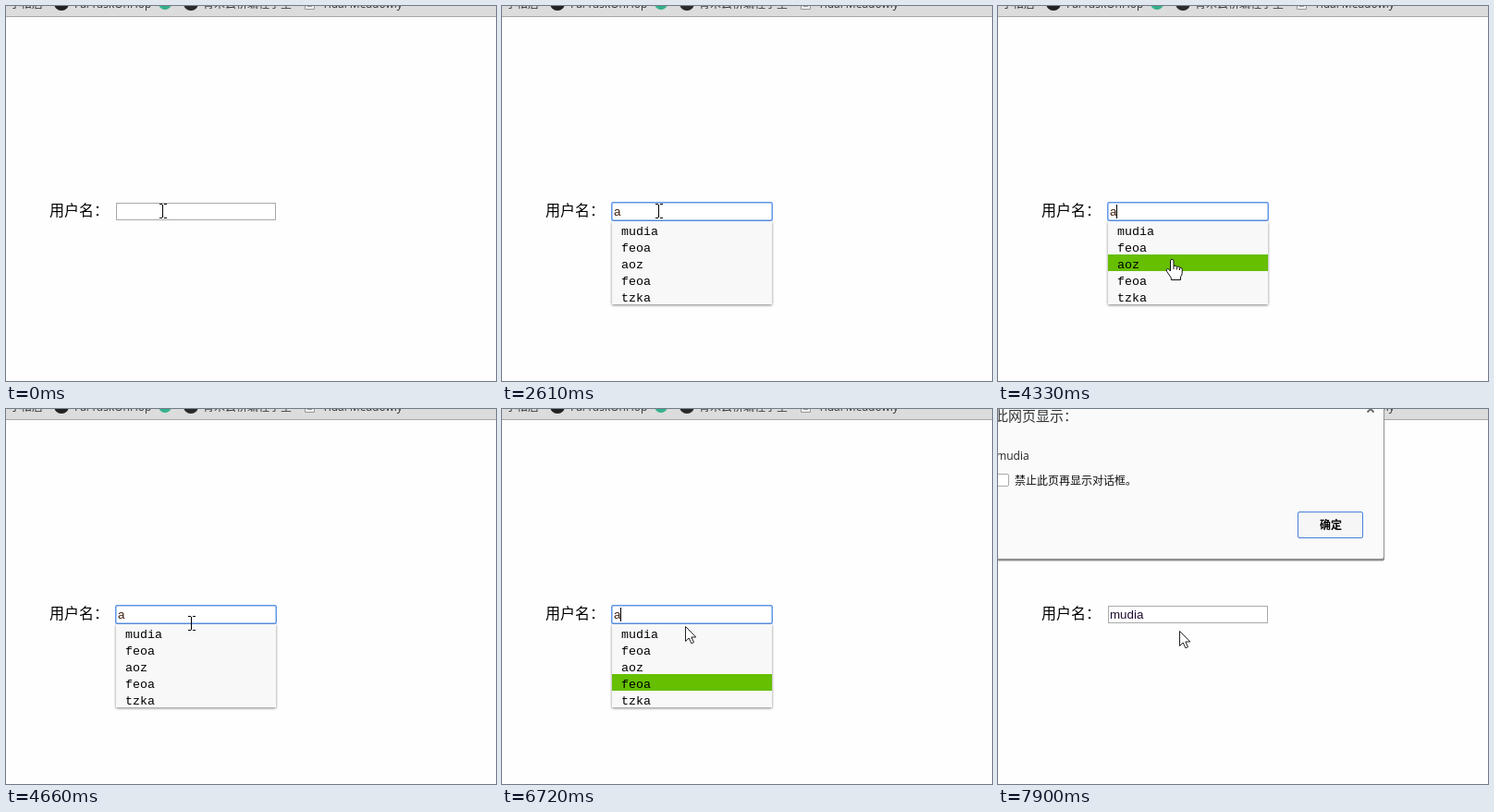
Recreate the animation shown at these times as an HTML page. Size 530x406 px, loop 8000 ms.

```html
<!DOCTYPE html>
<html lang="zh-CN">
<head>
<meta charset="utf-8">
<title>用户名</title>
<style>
html, body { margin: 0; width: 100%; height: 100%; overflow: hidden; background: #fefefe; }
svg { position: absolute; left: 0; top: 0; }
text { font-family: "Open Sans", "Noto Sans CJK SC", sans-serif; font-size: 12px; white-space: pre; }
#label { font: 300 16px "Noto Sans CJK SC", sans-serif; }
#value { font: 13.333px "Liberation Sans", Arial, sans-serif; }
#rows text { font: 13.333px "Liberation Mono", monospace; }
#menu { filter: drop-shadow(0 1px 1.5px rgba(0, 0, 0, .5)); }
.crisp { shape-rendering: crispEdges; }
</style>
</head>
<body>
<svg width="530" height="406" viewBox="0 0 530 406">
  <rect width="530" height="406" fill="#fefefe"/>

  <g id="bookmarks">
    <rect width="530" height="11" fill="#dcdcdc"/>
    <rect y="11" width="530" height="1" fill="#a6a6a6"/>
    <g fill="#333">
      <text x="4" y="2">小松居</text>
      <text x="74" y="2">FarTuskOnHop</text>
      <text x="213" y="2">青禾云桥编程学堂</text>
      <text x="342" y="2">Tidal Meadowly</text>
    </g>
    <circle cx="60" cy="-3" r="8" fill="#222"/>
    <circle cx="172" cy="-3" r="7" fill="#35b08c"/>
    <circle cx="200" cy="-3" r="8" fill="#2a2a2a"/>
    <path d="M323.500-8v11.500h10v-11.500M326 .5h5" fill="#eee" stroke="#999"/>
  </g>

  <text id="label" x="47" y="227">用户名：</text>
  <rect x="119.500" y="213.500" width="172" height="18" fill="#fff" stroke="#a9a9a9"/>
  <rect id="ring" x="118.750" y="212.750" width="173.500" height="19.500" rx="1.500" fill="#fff" stroke="#5e96ea" stroke-width="1.500"/>
  <text id="value" x="121" y="227"></text>
  <rect id="caret" class="crisp" y="215" width="1" height="15"/>

  <g id="list">
    <rect id="menu" x="119" y="233" width="173" height="90" fill="#f8f8f8"/>
    <g id="rows"></g>
  </g>

  <g id="dialog">
    <rect x="-10" y="-10" width="428" height="174.500" rx="2" fill="#8f8f8f"/>
    <rect x="-10" y="-10" width="427" height="172" rx="2" fill="#fafafa"/>
    <text x="-4" y="13" fill="#333" style="font-size:15px">此网页显示：</text>
    <path d="M399.500-3.500l7 7m0-7l-7 7" stroke="#666" stroke-width="1.800"/>
    <text x="-2" y="55" fill="#222">mudia</text>
    <rect x="-1.500" y="70.500" width="13" height="13" rx="1.500" fill="#fff" stroke="#aaa"/>
    <text x="18" y="82" fill="#111">禁止此页再显示对话框。</text>
    <rect x="324.500" y="111.500" width="70" height="28" rx="1.500" fill="#f6f6f6" stroke="#4a80dc"/>
    <text x="348" y="130" font-weight="700">确定</text>
  </g>

  <g id="mouse">
    <path id="beam" class="crisp" d="M-3.500-7.500h3m2 0h3M.5-7v14M-3.500 7.500h3m2 0h3" fill="none" stroke="#000"/>
    <path id="arrow" d="M.5 .5v16l3.700-3.500 2.700 5.800 2.600-1.200-2.700-5.600h5z" fill="#fff" stroke="#222"/>
    <g id="hand" stroke="#111" stroke-linejoin="round">
      <path d="M-1.500 13V2q0-1.700 1.700-1.700T2 2v5.500q3-1.200 3.300 .8 2.800-1 3.200 .9 2.700-.5 2.700 2v4q0 2-1.700 4v3.300H-.7v-2.200L-5.300 13.500q-1.200-2.200 .4-3 1.500-.5 3.400 2.500z" fill="#fff"/>
      <path d="M2 7.500v3.500M5.300 8.500v3M8.500 9.500v2.500" fill="none"/>
    </g>
  </g>
</svg>

<script>
const LOOP = 8000, ROW = 18, TOP = 233;
const FOCUS = 1250, OPEN = 1380, TYPED = 1990, FILTERED = 2080, PICKED = 7580;
const ALL = ['mudia', 'feoa', 'monlikurbet', 'aoz', 'feoa'];
const MATCHES = ['mudia', 'feoa', 'aoz', 'feoa', 'tzka'];
const BLINKS = [FOCUS, 1750, TYPED, 2610, 3140, 3640, 4150, 4660, 5180, 5680, 6230, 6780, 7240, PICKED];
const KEYS = [5230, 5420, 5620, 5830];
// time, x, y of the pointer's hot spot
const PATH = [
  [3410, 169, 222], [3750, 176, 273], [3900, 184, 288],
  [4280, 184, 288], [4440, 200, 232],
  [6719, 200, 232], [6720, 198, 235], [6750, 197, 238], [6780, 196, 240]
];

const $ = id => document.getElementById(id);
const show = (id, on) => $(id).style.display = on ? '' : 'none';
const passed = (times, t) => times.filter(k => k <= t).length;

function add(tag, attrs) {
  const el = document.createElementNS('http://www.w3.org/2000/svg', tag);
  for (const k in attrs) el.setAttribute(k, attrs[k]);
  return $('rows').appendChild(el);
}

const rows = MATCHES.map((_, i) => ({
  bar: add('rect', { x: 119, y: TOP + i * ROW, width: 173, height: ROW, fill: '#66bf00' }),
  text: add('text', { x: 129, y: TOP + 15 + i * ROW })
}));

function pointer(t) {
  t = Math.floor(t / 30) * 30;
  const i = PATH.findIndex(p => p[0] > t);
  if (i === 0) return PATH[0].slice(1);
  if (i < 0) return PATH[PATH.length - 1].slice(1);
  const [a, b] = [PATH[i - 1], PATH[i]];
  const k = (t - a[0]) / (b[0] - a[0]);
  return [1, 2].map(n => Math.round(a[n] + (b[n] - a[n]) * k));
}

function draw(t) {
  const [x, y] = pointer(t);
  const arrow = t >= PICKED || (t >= 6720 && t < 6750);
  const kind = arrow ? 'arrow' : y < TOP ? 'beam' : 'hand';
  for (const id of ['beam', 'arrow', 'hand']) show(id, id === kind);
  $('mouse').setAttribute('transform', `translate(${x} ${y})`);

  const picked = t >= PICKED, typed = t >= TYPED;
  show('ring', t >= FOCUS && !picked);
  $('value').textContent = picked ? 'mudia' : typed ? 'a' : '';
  $('value').setAttribute('fill', picked ? '#1c0c30' : '#3c1c0c');
  show('caret', passed(BLINKS, t) % 2);
  $('caret').setAttribute('x', typed ? 128 : 121);

  show('list', t >= OPEN && !picked);
  const names = t < FILTERED ? ALL : MATCHES;
  const hover = kind === 'hand' ? Math.floor((y - TOP) / ROW) : -1;
  const selected = passed(KEYS, t) - 1;
  rows.forEach((row, i) => {
    row.text.textContent = names[i];
    row.bar.style.display = i === hover || i === selected ? '' : 'none';
  });

  $('dialog').setAttribute('opacity', Math.min(1, Math.max(0, (t - 7640) / 240)));
}

const start = performance.now();
function tick() {
  draw((performance.now() - start) % LOOP);
  requestAnimationFrame(tick);
}
tick();
</script>
</body>
</html>
```
